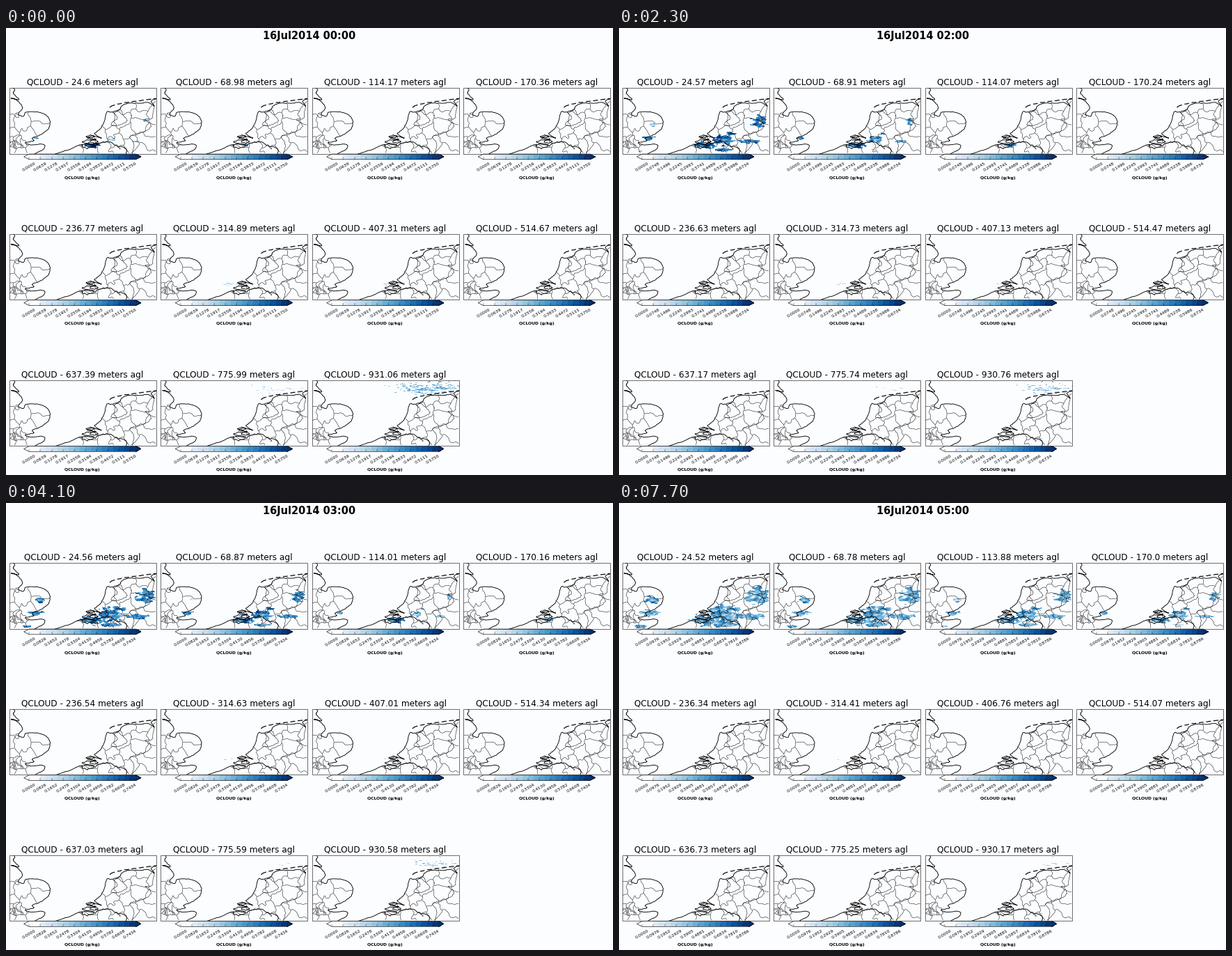
Recreate the animation shown at these times as a matplotlib script. Size 872 px wide and 642 px high, loop 8 s.

```python
import numpy as np
import matplotlib.pyplot as plt
from matplotlib.animation import FuncAnimation
from matplotlib.collections import LineCollection, PolyCollection
from matplotlib.patches import Polygon, Rectangle
from matplotlib.path import Path

WIDTH, HEIGHT, DPI = 872, 642, 100
PX = 72 / DPI
INTERVAL, FRAMES = 100, 80
FIRST_CHANGE, HOLD, HOURS = 500, 1800, 6
PANELS = 11
LEFT, TOP, PANEL_W, PANEL_H = 4.5, 86, 211, 94.6
STEP_X, STEP_Y = 217.5, 209.8
ROWS, COLS = 94, 211
BACKGROUND = "#fcfdff"
BLUES = plt.get_cmap("Blues")
LEVELS = 19

START_HEIGHTS = (24.6, 68.98, 114.17, 170.36, 236.77, 314.89,
                 407.31, 514.67, 637.39, 775.99, 931.06)
END_HEIGHTS = (24.52, 68.78, 113.88, 170.0, 236.34, 314.41,
               406.76, 514.07, 636.73, 775.25, 930.17)
TOP_TICK = (0.575, 0.65224, 0.6734, 0.7434, 0.8223, 0.8786)

rng = np.random.default_rng(7)
GRID_Y, GRID_X = np.mgrid[0:ROWS, 0:COLS] + np.array([TOP + .5, LEFT + .5])[:, None, None]


def offset(panel):
    return np.array([STEP_X * (panel % 4), STEP_Y * (panel // 4)])


def smooth_noise(across, down):
    z = rng.standard_normal((ROWS, COLS))
    for axis, times in ((1, across), (0, down)):
        for _ in range(times):
            z = z + np.roll(z, 1, axis) + np.roll(z, -1, axis)
    return (z - z.mean()) / z.std()


def curve(points, steps=6):
    """Catmull-Rom spline through the points."""
    p = np.array(points, float)
    p = np.vstack([2 * p[0] - p[1], p, 2 * p[-1] - p[-2]])
    t = np.linspace(0, 1, steps, endpoint=False)[:, None]
    parts = [.5 * (2 * b + (c - a) * t + (2 * a - 5 * b + 4 * c - d) * t ** 2
                   + (3 * b - a - 3 * c + d) * t ** 3)
             for a, b, c, d in zip(p, p[1:], p[2:], p[3:])]
    return np.vstack(parts + [p[-2:-1]])


# ---- map: key points in the first panel, roughened by seeded noise ----
ENGLAND = [(6, 84), (13, 88), (11, 94), (19, 103), (8, 101), (13, 102), (19, 107),
           (24, 115), (18, 123), (25, 127), (29, 121), (45, 121), (57, 125), (63, 133),
           (62, 143), (55, 150), (46, 155), (38, 158), (40, 162), (28, 165), (36, 168),
           (54, 167), (54, 174), (42, 180), (41, 183)]
CONTINENT = [(60, 183), (74, 180), (90, 175), (103, 169), (113, 167), (127, 168),
             (110, 164), (118, 161), (130, 160), (117, 158), (126, 155), (137, 158),
             (127, 152), (134, 146), (140, 137), (145, 121), (152, 121), (163, 117),
             (166, 112), (176, 108), (192, 108), (204, 107), (213, 112), (209, 105),
             (217, 101)]
SOUTH_BORDER = [(108, 168), (113, 172), (125, 171), (136, 165), (148, 164), (159, 169),
                (172, 173), (173, 183)]
EAST_BORDER = [(213, 113), (209, 130), (200, 131), (209, 140), (199, 149), (179, 155),
               (184, 167), (181, 183)]
LAKE = [(155, 122), (160, 129), (151, 138), (158, 140), (174, 134), (168, 125), (165, 118)]
ENGLISH_SITES = [(12, 113), (48, 128), (48, 143), (22, 136), (32, 156), (8, 152),
                 (40, 172), (5, 139), (20, 177)]
MAINLAND_SITES = [(194, 113), (173, 115), (192, 125), (190, 137), (165, 132), (147, 134),
                  (136, 152), (152, 148), (175, 148), (158, 162), (181, 166), (119, 163),
                  (143, 172), (120, 178), (100, 178), (208, 148), (202, 161), (213, 126),
                  (194, 174), (163, 178)]

lines, widths = [], []


def add_line(points, width, jitter=0.0):
    points = np.array(points, float)
    lines.append(points + rng.normal(0, 1, points.shape) * jitter)
    widths.append(width * PX)


def island_y(x):
    return 106.5 - .13 * (x - 175) + 5.5 * np.exp((147 - x) / 7)


def district_lines(ax, sites, shore):
    """Borders halfway between neighbouring centres, kept to the land."""
    sites = np.array(sites, float)
    warp_x, warp_y = GRID_X + 1.6 * smooth_noise(9, 9), GRID_Y + 1.6 * smooth_noise(9, 9)
    gaps = np.hypot(warp_x - sites[:, 0, None, None], warp_y - sites[:, 1, None, None])
    land = Path(shore).contains_points(np.column_stack([GRID_X.ravel(), GRID_Y.ravel()]))
    sea = ~land.reshape(GRID_X.shape)
    for i, own in enumerate(gaps):
        others = np.delete(gaps, i, axis=0).min(axis=0)
        shape = ax.contour(GRID_X, GRID_Y, np.ma.array(own - others, mask=sea), levels=[0])
        for segment in shape.allsegs[0]:
            add_line(segment, .27)
        shape.remove()


def build_map(ax):
    for shore in (ENGLAND, CONTINENT):
        add_line(curve(shore), .9, .3)
    add_line(curve(SOUTH_BORDER), .9, .5)
    add_line(curve(EAST_BORDER), .5, .4)
    add_line(curve(LAKE + LAKE[:1]), .5, .4)
    for x in np.arange(149, 215, 10.5):
        dash = np.linspace(x, x + 7, 5)
        add_line(np.column_stack([dash, island_y(dash)]), 1.2, .2)
    turn = np.linspace(0, 2 * np.pi, 14)
    for x, y in ((121, 156), (126, 163)):
        add_line(np.column_stack([x + 6 * np.cos(turn), y + 1.8 * np.sin(turn)]), .9, .4)
    angle, reach = rng.uniform(0, 2 * np.pi, 18), np.sqrt(rng.uniform(0, 1, 18))
    city = np.column_stack([13 + 9 * reach * np.cos(angle), 167 + 5 * reach * np.sin(angle)])
    district_lines(ax, np.vstack([ENGLISH_SITES, city]), np.vstack([curve(ENGLAND), [(0, 183), (0, 84)]]))
    district_lines(ax, MAINLAND_SITES, np.vstack([curve(CONTINENT), [(217, 183)]]))


# ---- clouds ----------------------------------------------------------
# x, y, full radii, hour at which the bank forms near the ground
FOG_BANKS = [(126, 168, 22, 8, 0), (151, 160, 25, 12, 1.1), (201, 134, 17, 13, 1.2),
             (187, 163, 27, 4.5, 1.2), (150, 175, 27, 3.5, 2), (162, 152, 14, 5, 1.6),
             (44, 158, 14, 4.5, 1), (49, 139, 14, 9, 3), (31, 177, 10, 3.5, 3)]

PATCHES, SPECKS, SHADES = smooth_noise(6, 1), smooth_noise(3, 0), smooth_noise(3, 1)


def paint(field, noise, x, y, rx, ry, fill, tone, slope=0):
    """Ragged ellipse; a low fill leaves only scattered specks."""
    dist = ((GRID_X - x) / rx) ** 2 + ((GRID_Y - y - slope * (GRID_X - x)) / ry) ** 2
    inside = (noise * .5 < fill - dist) & (dist < 1.8)
    np.maximum(field, inside * np.clip(tone + .1 * SHADES, .1, 1), out=field)


def cloud_field(hour, panel):
    field = np.zeros((ROWS, COLS))
    if panel < 4:  # fog spreads outward and upward with time
        for x, y, rx, ry, onset in FOG_BANKS:
            age = hour + 1.5 - onset - 1.3 * panel
            if age > 0:
                size = np.sqrt(age / 6.5)
                tone = (.88 - .07 * hour) * min(1, .4 + .4 * age)
                paint(field, PATCHES, x, y, rx * size, ry * size, .95, tone)
    elif panel in (5, 6):  # thin wisps that break up
        fill = .3 - .12 * hour - .2 * (panel == 5)
        paint(field, SPECKS, 105 + 8 * (panel - 5), 158, 11, 3, fill, .24)
    elif panel >= 9:  # high sheet that dissolves toward the east
        fill = (.12 if panel == 10 else -.5) - .15 * hour
        tone = .43 - .03 * hour if panel == 10 else .2
        paint(field, SPECKS, 158 + 5 * hour, 99, 45 - 3 * hour, 9, fill, tone, .1)
        paint(field, SPECKS, 190, 95, 30, 10, fill - .1, tone)
        if panel == 10 and hour:
            paint(field, SPECKS, 166, 170, 10, 3, -.05, .22)
    return field


def cloud_picture(hour):
    stage = np.zeros((HEIGHT, WIDTH))
    for panel in range(PANELS):
        x, y = np.round(offset(panel) + (LEFT, TOP)).astype(int)
        stage[y:y + ROWS, x:x + COLS] = cloud_field(hour, panel)
    rgba = BLUES((np.floor(np.clip(stage, 0, .999) * LEVELS) + .5) / LEVELS)
    rgba[..., 3] = stage > 0
    return rgba


pictures = [cloud_picture(hour) for hour in range(HOURS)]

# ---- stage -----------------------------------------------------------
fig = plt.figure(figsize=(WIDTH / DPI, HEIGHT / DPI), dpi=DPI, facecolor=BACKGROUND)
ax = fig.add_axes([0, 0, 1, 1])
ax.axis("off")
build_map(ax)
sky = ax.imshow(pictures[0], extent=(0, WIDTH, HEIGHT, 0), aspect="auto",
                interpolation="nearest", zorder=1)
ax.set_xlim(0, WIDTH)
ax.set_ylim(HEIGHT, 0)

BAR_L, BAR_R, BAR_T, BAR_B, TIP = 33.3, 186.3, 181, 188.8, 7.65
BAR_M = (BAR_T + BAR_B) / 2
CELL = (BAR_R - BAR_L) / LEVELS
TICKS = BAR_L + 2 * CELL * np.arange(10)


def label(x, y, px, text="", **style):
    return ax.text(x, y, text, fontsize=px * PX, family="DejaVu Sans", ha="center", **style)


def draw_bar(shift):
    cells = [np.array([(x, BAR_T), (x + CELL, BAR_T), (x + CELL, BAR_B), (x, BAR_B)]) + shift
             for x in BAR_L + CELL * np.arange(2, LEVELS)]
    cells.append(np.array([(BAR_R, BAR_T), (BAR_R + TIP, BAR_M), (BAR_R, BAR_B)]) + shift)
    colors = [BLUES((i + .5) / LEVELS) for i in range(2, LEVELS)] + [BLUES(1.0)]
    ax.add_collection(PolyCollection(cells, facecolors=colors, edgecolors="none",
                                     antialiaseds=False, zorder=2))
    outline = [(BAR_L - TIP, BAR_M), (BAR_L, BAR_T), (BAR_R, BAR_T),
               (BAR_R + TIP, BAR_M), (BAR_R, BAR_B), (BAR_L, BAR_B)]
    ax.add_patch(Polygon(np.array(outline) + shift, fill=False, ec="black",
                         lw=.6 * PX, zorder=3))
    marks = [np.array([(x, BAR_B), (x, BAR_B - 3.5)]) + shift for x in TICKS]
    ax.add_collection(LineCollection(marks, colors="black", linewidths=.4 * PX, zorder=3))


headline = label(436, 16, 14.55, weight="bold")
titles, tick_labels = [], []
for panel in range(PANELS):
    shift = dx, dy = offset(panel)
    frame = Rectangle((LEFT + dx, TOP + dy), PANEL_W, PANEL_H, fill=False,
                      ec="#333333", lw=.7 * PX, zorder=4)
    ax.add_patch(frame)
    land = LineCollection([line + shift for line in lines], colors="black",
                          linewidths=widths, zorder=3)
    ax.add_collection(land)
    land.set_clip_path(frame)
    draw_bar(shift)
    titles.append(label(110 + dx, 82 + dy, 12.15))
    label(109.8 + dx, 216.6 + dy, 6.1, "QCLOUD (g/kg)", weight="bold")
    tick_labels.append([label(x + dx, 199.4 + dy, 6.1, rotation=30, va="center")
                        for x in TICKS])


def update(frame):
    hour = int((frame * INTERVAL - FIRST_CHANGE) // HOLD) + 1
    sink = (hour / (HOURS - 1)) ** 1.2
    headline.set_text(f"16Jul2014 {hour:02d}:00")
    sky.set_data(pictures[hour])
    for title, start, end, ticks in zip(titles, START_HEIGHTS, END_HEIGHTS, tick_labels):
        title.set_text(f"QCLOUD - {round(start + (end - start) * sink, 2)} meters agl")
        for k, tick in enumerate(ticks):
            tick.set_text(f"{TOP_TICK[hour] * k / 9:.4f}")
    return [headline, sky, *titles]


animation = FuncAnimation(fig, update, frames=FRAMES, interval=INTERVAL, repeat=True)
plt.show()
```
